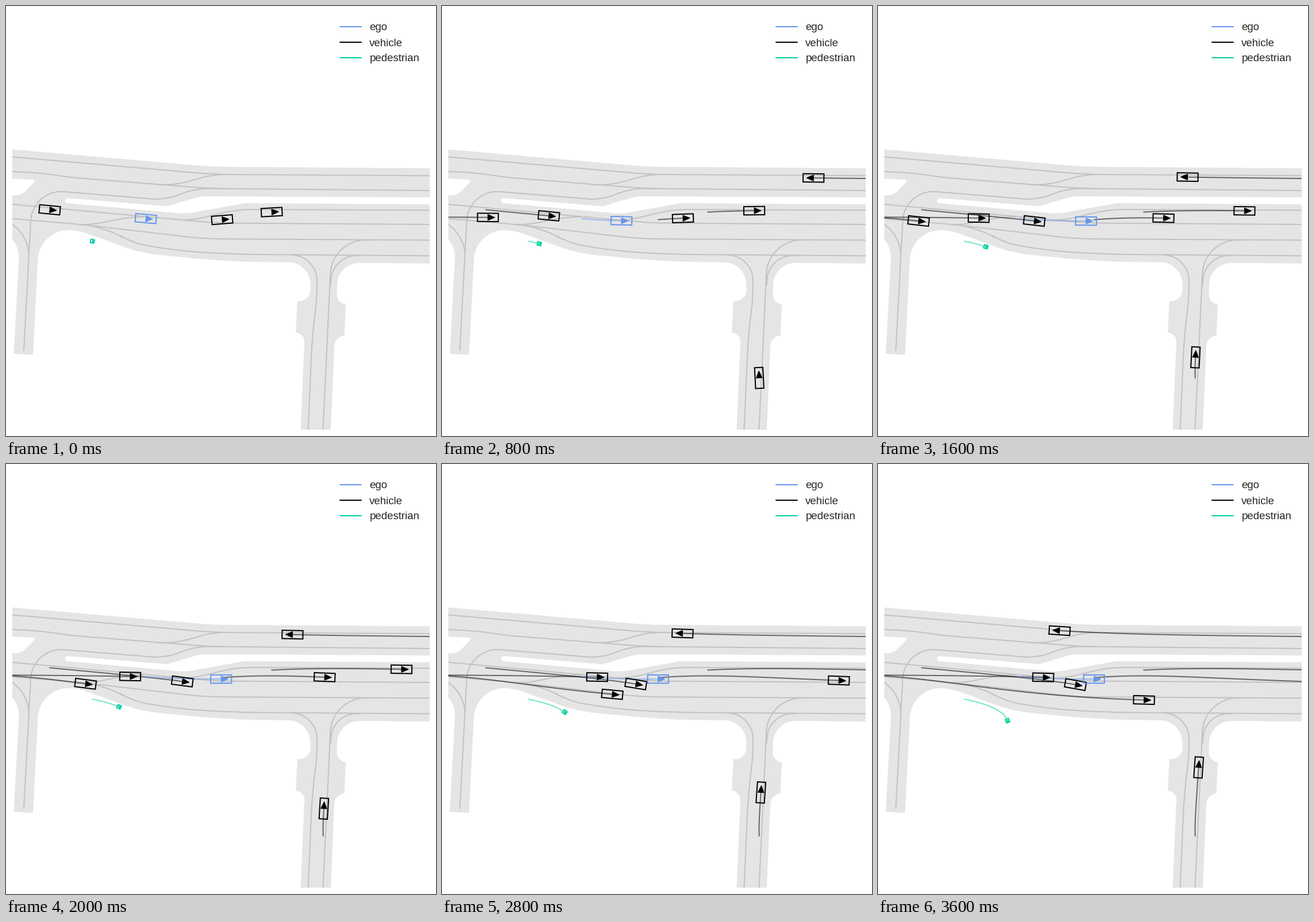
Animation, 748 px wide and 748 px high, one loop 3.8 s. Source, as a matplotlib script:

```python
from math import comb

import numpy as np
import matplotlib.pyplot as plt
from matplotlib.animation import FuncAnimation
from matplotlib.patches import PathPatch, Polygon
from matplotlib.path import Path

SIZE, DPI = 748, 80
LOW, HIGH = 11, 737
FRAMES, STEP = 19, 200
LAST = FRAMES - 1
PX = 72 / DPI
ROAD, LANE = "#e5e5e5", "#c2c2c2"
EGO, VEHICLE, PEDESTRIAN = "#6495ed", "black", "#00cfa0"

fig = plt.figure(figsize=(SIZE / DPI, SIZE / DPI), dpi=DPI, facecolor="white")
span = (HIGH - LOW) / SIZE
ax = fig.add_axes([LOW / SIZE, LOW / SIZE, span, span])
ax.set_xlim(LOW, HIGH)
ax.set_ylim(HIGH, LOW)
ax.axis("off")


def bezier(*controls, n=300):
    t = np.linspace(0, 1, n)[:, None]
    m = len(controls) - 1
    return sum(comb(m, i) * t ** i * (1 - t) ** (m - i) * np.array(p)
               for i, p in enumerate(controls))


def rounded(*corners):
    """Straight runs between corners (x, y) or (x, y, rounding length)."""
    xy = np.array([c[:2] for c in corners], float)
    points, codes = [], []
    for i, corner in enumerate(corners):
        p = xy[i]
        if len(corner) == 2:
            points.append(p)
            codes.append(Path.LINETO)
            continue
        before, after = xy[i - 1] - p, xy[(i + 1) % len(xy)] - p
        a = p + before / np.hypot(*before) * corner[2]
        b = p + after / np.hypot(*after) * corner[2]
        points += [a, a + (p - a) * 0.55, b + (p - b) * 0.55, b]
        codes += [Path.LINETO] + [Path.CURVE4] * 3
    codes[0] = Path.MOVETO
    return Path(points, codes)


def fill(color, *corners):
    ax.add_patch(PathPatch(rounded(*corners), fc=color, lw=0, zorder=1))


def lane(path):
    ax.add_patch(PathPatch(path, fill=False, ec=LANE, lw=2 * PX,
                           capstyle="round", zorder=2))


def draw_map():
    fill(ROAD,
         (11, 249.5), (358, 279.6, 22), (737, 282.3), (737, 448),
         (577, 446.5, 38), (575, 518, 17), (591, 519), (588.7, 573.5),
         (571.8, 574, 17), (565, 737), (512.5, 737), (519.8, 569, 16),
         (504, 568), (507, 513.3), (529.5, 514, 20), (529.5, 446, 38),
         (390, 445, 60), (235, 430, 30), (125, 390, 16), (58, 390, 50),
         (47, 607), (13.5, 605), (23.3, 424, 14), (11, 406))
    fill("white", (11, 300.3), (53, 302.3, 7), (27, 329.2, 9), (11, 329.3))
    fill("white", (103, 333.8, 5), (280, 348.3), (338, 331, 12), (737, 333),
         (737, 345), (415, 343), (312, 361.5, 13), (103, 342.7, 4))

    # through lanes, from top to bottom
    lane(rounded((11, 262.5), (362, 293, 30), (737, 295.2)))
    lane(rounded((11, 288), (65, 290.5, 30), (110, 298, 15),
                 (355, 317.5, 30), (737, 321)))
    lane(rounded((11, 345), (365, 377.5, 25), (737, 380)))
    lane(rounded((11, 370), (130, 380, 30), (345, 405, 30), (737, 407.3)))
    lane(rounded((125, 380), (170, 382.5, 40), (220, 412.5, 25),
                 (300, 426, 40), (400, 432, 40), (737, 434.5)))

    # merges
    lane(Path(bezier((265, 311), (325, 312), (330, 293), (385, 293))))
    lane(Path(bezier((305, 372), (350, 373), (370, 354), (430, 354))))
    lane(rounded((430, 354), (737, 355.3)))
    lane(Path(bezier((130, 380.5), (175, 380), (190, 367), (240, 367))))

    # turns into the side roads
    lane(rounded((31, 599), (40, 430, 20), (46, 318.5, 55),
                 (280, 337.7, 24), (325, 317.5, 24), (380, 317.7)))
    lane(Path(bezier((11, 380), (28, 392), (40, 412), (40, 436))))
    lane(rounded((496, 433), (541, 433, 45), (541, 505, 20),
                 (532.5, 580, 25), (525.5, 737)))
    lane(rounded((551.5, 737), (567, 407, 58), (640, 407)))
    lane(rounded((565, 485), (567, 434.3, 42), (615, 434.3)))


def draw_legend():
    rows = (("ego", EGO), ("vehicle", VEHICLE), ("pedestrian", PEDESTRIAN))
    for i, (label, color) in enumerate(rows):
        y = 36 + 27 * i
        ax.plot([581, 618], [y, y], color=color, lw=2 * PX,
                solid_capstyle="round")
        ax.text(632.3, y + 6.5, label, color="#262626", fontsize=16.8,
                family="Liberation Sans", va="baseline")


class Agent:
    """Follows a Bezier route; key speeds are spread evenly over its time."""

    def __init__(self, color, route, speeds, first=0, end=LAST,
                 box=(36.2, 14.4), arrow=(12, 5.2)):
        self.first = first
        self.route = bezier(*route)
        steps = np.hypot(*np.diff(self.route, axis=0).T)
        self.along = np.append(0, np.cumsum(steps))
        self.time = np.linspace(first, end, 500)
        speed = np.interp(self.time, np.linspace(first, end, len(speeds)),
                          speeds)
        gain = (speed[1:] + speed[:-1]) / 2 * np.diff(self.time)
        self.travel = np.append(0, np.cumsum(gain))
        self.box = np.array(box) / 2 * [(-1, -1), (1, -1), (1, 1), (-1, 1)]
        tip, side = arrow
        self.tip = np.array([(0, -side), (tip, 0), (0, side)])
        self.trail, = ax.plot([], [], color=color, alpha=0.55, lw=2 * PX,
                              solid_capstyle="round", zorder=3)
        self.frame = ax.add_patch(Polygon(self.box, fill=False, ec=color,
                                          lw=2 * PX, zorder=4))
        self.arrow = ax.add_patch(Polygon(self.tip, fc=color, ec=color, lw=PX,
                                          joinstyle="round", zorder=5))

    def at(self, distance):
        return np.array([np.interp(distance, self.along, axis)
                         for axis in self.route.T])

    def update(self, k):
        seen = k >= self.first
        d = min(np.interp(k, self.time, self.travel), self.along[-1])
        here = self.at(d)
        dx, dy = self.at(d + 1) - self.at(d - 1)
        c, s = np.array([dx, dy]) / np.hypot(dx, dy)
        turn = np.array([(c, s), (-s, c)])
        box = self.box @ turn + here
        self.frame.set_xy(box)
        # a box is drawn only when it fits the view completely
        self.frame.set_visible(seen and box.min() >= LOW and box.max() <= HIGH)
        self.arrow.set_xy(self.tip @ turn + here)
        self.arrow.set_visible(seen)
        self.trail.set_data(*self.at(np.linspace(0, d, 100)))
        self.trail.set_visible(k > self.first)


draw_map()
draw_legend()

agents = [
    Agent(VEHICLE, [(76, 354.5), (170, 363.5), (300, 375), (350, 385)],
          [31, 23.3, 18.2, 2.3, 1]),
    Agent(VEHICLE, [(376, 371.7), (480, 363.5), (560, 373), (763, 379)],
          [8, 14.3, 29.3, 36.5, 36]),
    Agent(VEHICLE, [(462.2, 358.5), (540, 354.2), (640, 356), (760, 358.6)],
          [18.2, 22.8, 25.2, 28.5, 30]),
    Agent(VEHICLE, [(-22, 367.2), (120, 367.5), (230, 369.7), (305, 371.5)],
          [25.5, 25.4, 20.8, 9.8, 0]),
    Agent(VEHICLE, [(-21, 367), (110, 371), (230, 405), (475, 410.8)],
          [29, 32.5, 39.5, 43, 40], first=5),
    Agent(VEHICLE, [(756, 300.3), (600, 298.5), (430, 297.5), (310, 289.5)],
          [41, 28.5, 18.8, 20.8, 30], first=1),
    Agent(VEHICLE, [(551.8, 647), (550.6, 625), (553.5, 590), (558, 524)],
          [13, 5.8, 6, 9.2, 13.2], first=4),
    Agent(EGO, [(243.2, 369.8), (290, 374), (330, 374), (378, 374.1)],
          [18.5, 17, 13.5, 8.5, 0], end=11),
    Agent(PEDESTRIAN, [(150.3, 409.2), (185, 416), (222, 428), (226, 449)],
          [4.82, 4.82], box=(6.4, 6), arrow=(3, 2)),
]


def update(k):
    for agent in agents:
        agent.update(k)


anim = FuncAnimation(fig, update, frames=FRAMES, interval=STEP, repeat=True,
                     repeat_delay=0, blit=False)
plt.show()
```
